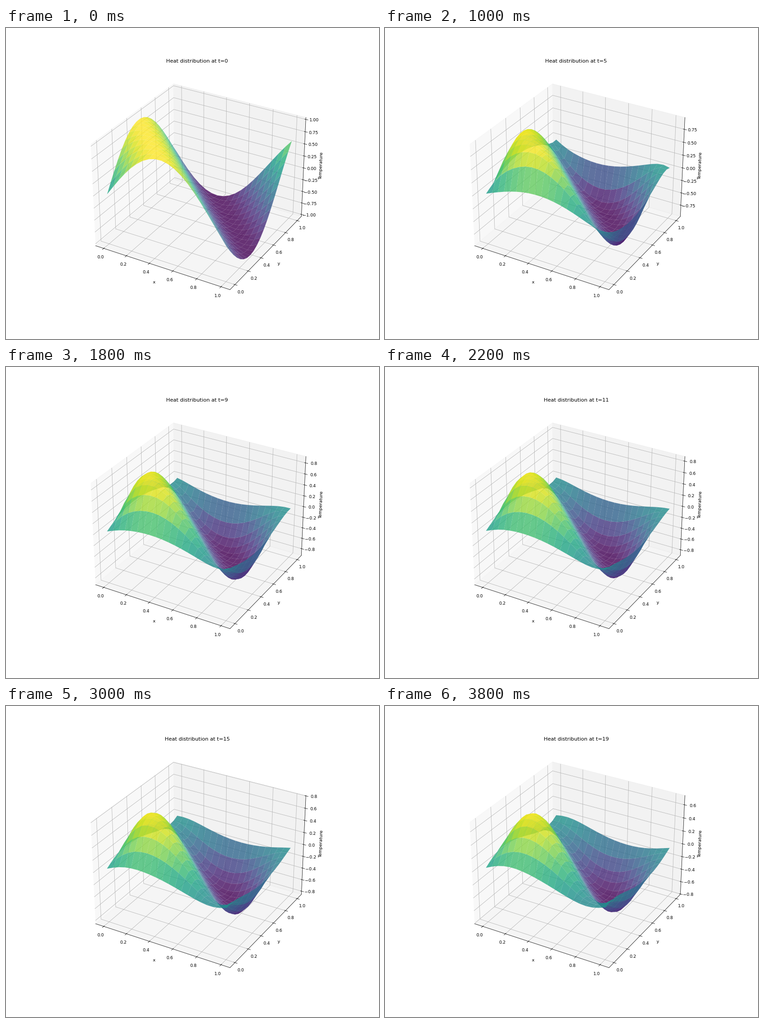
A matplotlib script that plays this animation: 820x683 px, repeating every 4 s.

```python
import numpy as np
import matplotlib.pyplot as plt
from matplotlib.animation import FuncAnimation

DPI = 820 / 12
N = 20          # grid points per side, also the number of time steps
ALPHA = 0.01    # diffusivity
K = 3.46        # wave number of the initial field

axis = np.linspace(0, 1, N)
X, Y = np.meshgrid(axis, axis)
dx = dt = axis[1]
R = ALPHA * dt / dx**2


def step(u):
    """One explicit heat step with periodic edges."""
    around = sum(np.roll(u, s, axis=a) for s in (1, -1) for a in (0, 1))
    return u + R * (around - 4 * u)


states = [np.sin(K * (X + Y))]
for _ in range(N - 1):
    states.append(step(states[-1]))

fig = plt.figure(figsize=(12, 683.005 / DPI), dpi=DPI)
ax = fig.add_subplot(projection="3d")


def draw(i):
    ax.clear()
    ax.plot_surface(X, Y, states[i], cmap="viridis", alpha=0.8)
    ax.set_xlabel("x")
    ax.set_ylabel("y")
    ax.set_zlabel("Temperature")
    ax.set_title(f"Heat distribution at t={i}")
    return []


anim = FuncAnimation(fig, draw, frames=N, interval=200, repeat=True)
plt.show()
```
